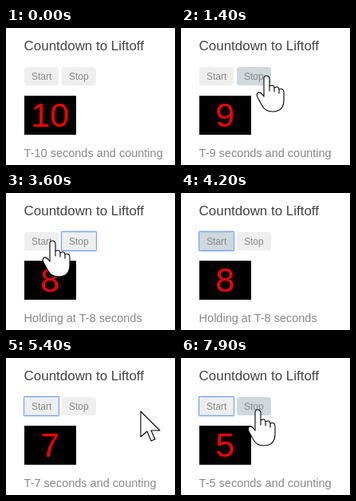
Write an HTML page that moves like this. It is 212 px wide and 172 px high and loops after 8000 ms.

```html
<!DOCTYPE html>
<html lang="en">
<head>
<meta charset="utf-8">
<title>Countdown</title>
<style>
  html, body { margin: 0; height: 100%; overflow: hidden; background: #fff; }
  svg { display: block; width: 212px; height: 172px; font-family: "Liberation Sans", Arial, sans-serif; }
  text { fill: #888; }
  .heading { font-size: 16.95px; fill: #444; }
  .label { font-size: 12px; }
  #digits { font-size: 43.2px; fill: #f00; text-anchor: middle; }
  #message { font-size: 14.5px; }
  .ring { fill: none; stroke: #78a5f5; stroke-width: 1.3; }
  #cursor path { fill: #fff; stroke: #000; stroke-width: 1.1; stroke-linejoin: round; }
</style>
</head>
<body>
<svg viewBox="0 0 212 172">
  <text class="heading" x="22.6" y="28">Countdown to Liftoff</text>
  <g id="start" transform="translate(23 49)">
    <rect class="face" width="43" height="23" rx="3.6"/>
    <rect class="ring" x="-.5" y="-.5" width="44" height="24" rx="1"/>
    <text class="label" x="9" y="16">Start</text>
  </g>
  <g id="stop" transform="translate(70 49)">
    <rect class="face" width="43" height="23" rx="3.6"/>
    <rect class="ring" x="-.5" y="-.5" width="44" height="24" rx="1"/>
    <text class="label" x="9" y="16">Stop</text>
  </g>
  <rect x="23" y="85" width="65" height="49"/>
  <text id="digits" x="55.3" y="124"></text>
  <text id="message" x="22.6" y="162"></text>
  <g id="cursor">
    <path id="arrow" d="M0 0V32L8 25L13 37L18 35L13 24H24Z"/>
    <path id="hand" d="M-4 26V3Q-4 0-1 0Q3 0 3 4V19V13Q9 10 9 16V20V15Q15 12 15 18V22V17Q21 15 21 21V30Q21 45 7 45Q-2 45-6 38L-12 27Q-14 23-11 21Q-8 20-4 26Z"/>
  </g>
</svg>
<script>
const LOOP = 8000, STEP = 100;
const $ = id => document.getElementById(id);

const entry = { x: 166, y: 116 };
const moves = [
  { from: 300, to: 800, x: 104, y: 63 },
  { from: 1000, to: 1600, x: 108, y: 60 },
  { from: 1800, to: 2300, x: 90, y: 70 },
  { from: 3300, to: 3900, x: 48, y: 57 },
  { from: 4900, to: 5400, x: 169, y: 67 },
  { from: 7200, to: 7900, x: 97, y: 65 }
];

const within = (v, from, to) => v >= from && v < to;
const show = (el, on) => el.style.display = on ? "" : "none";

function easeOut(t, from, to) {
  const k = Math.min(1, Math.max(0, (t - from) / (to - from)));
  return 1 - (1 - k) ** 2;
}

function cursorAt(t) {
  return moves.reduce((p, m) => {
    const k = easeOut(t, m.from, m.to);
    return { x: p.x + (m.x - p.x) * k, y: p.y + (m.y - p.y) * k };
  }, entry);
}

function buttonAt({ x, y }) {
  if (!within(y, 49, 73)) return "";
  return within(x, 23, 66) ? "start" : within(x, 70, 114) ? "stop" : "";
}

// One count per second, paused while holding
function countAt(t) {
  const running = Math.min(t, 2300) + Math.max(0, t - 5100);
  return 10 - Math.floor((running + 500) / 1000);
}

function draw(t) {
  t = Math.floor(t / STEP) * STEP;
  const count = countAt(t), holding = within(t, 2700, 5300);
  $("digits").textContent = count;
  $("message").textContent = holding ? `Holding at T-${count} seconds` : `T-${count} seconds and counting`;

  // Hover styling trails the pointer by one step
  const hovered = buttonAt(cursorAt(t - STEP));
  const focused = t < 2700 ? "" : t < 4200 ? "stop" : "start";
  for (const id of ["start", "stop"]) {
    $(id).querySelector(".face").setAttribute("fill", hovered === id ? "#cfd8dc" : "#eee");
    show($(id).querySelector(".ring"), focused === id);
  }

  const pos = cursorAt(t), overButton = buttonAt(pos) !== "";
  show($("cursor"), t >= 400 && !within(t, 2300, 3400) && !within(t, 4200, 5000));
  show($("hand"), overButton);
  show($("arrow"), !overButton);
  $("cursor").setAttribute("transform", `translate(${Math.round(pos.x)} ${Math.round(pos.y)})`);
}

const began = performance.now();
function tick() {
  draw((performance.now() - began) % LOOP);
  requestAnimationFrame(tick);
}
tick();
</script>
</body>
</html>
```
